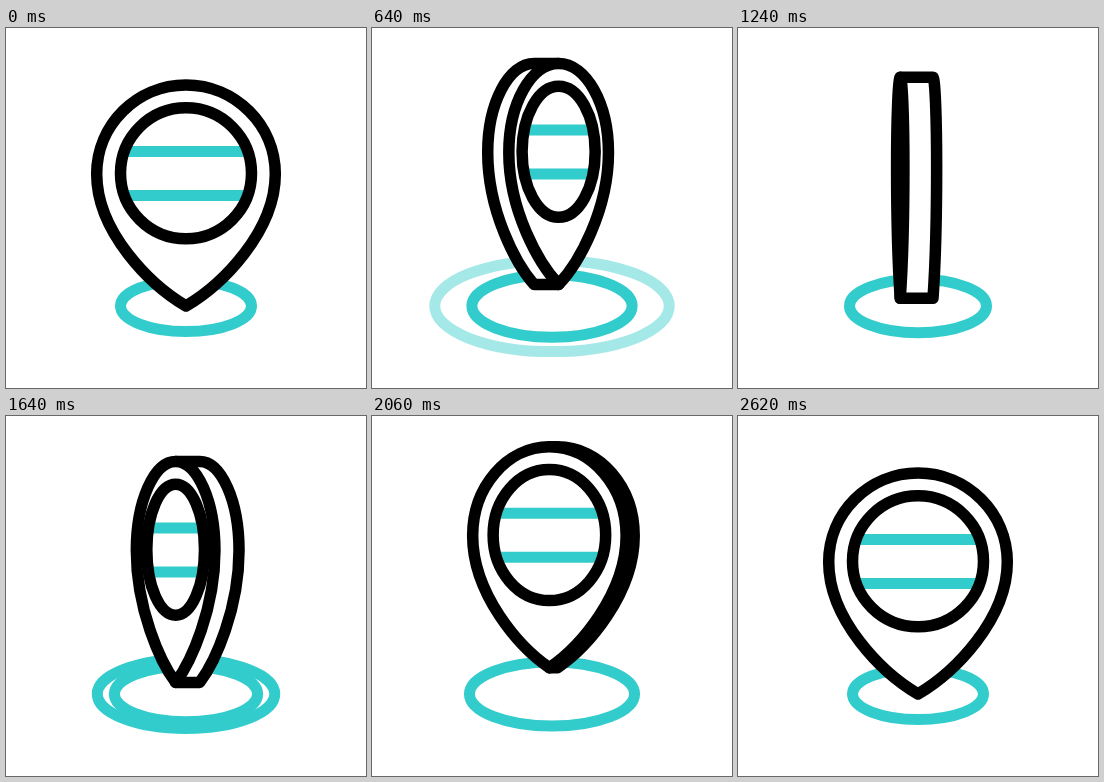
An HTML page with a canvas that plays this animation: 360 px wide and 360 px high, repeating every 3 s.

```html
<!DOCTYPE html>
<html lang="en">
<head>
<meta charset="utf-8">
<title>Turning map pin</title>
<style>
  html, body { margin: 0; width: 100%; height: 100%; overflow: hidden; background: #fff; }
  canvas { display: block; width: 100vw; height: 100vh; }
</style>
</head>
<body>
<canvas id="stage"></canvas>
<script>
const SIZE = 360, LOOP = 3000, STEP = 20;
const TEAL = '#33cccc', BLACK = '#000', WHITE = '#fff';
const CX = 180, TOP = 57, MID = 146, TIP = 278, HALF = 89.3;
const BOUNCE = { start: 193, leg: 603, height: 29 };
const TURN = { start: 197, half: 1002 };
const RIPPLE = { life: 550, fadeFrom: 318 };

const canvas = document.getElementById('stage');
const ctx = canvas.getContext('2d');
const ratio = window.devicePixelRatio || 1;
canvas.width = canvas.height = SIZE * ratio;
ctx.scale(ratio, ratio);
ctx.lineJoin = 'round';

const clamp = v => Math.min(1, Math.max(0, v));
const smooth = v => v * v * (3 - 2 * v);

function stroke(color, width) {
  ctx.strokeStyle = color;
  ctx.lineWidth = width;
  ctx.stroke();
}

function ring(rx, alpha) {
  ctx.globalAlpha = alpha;
  ctx.beginPath();
  ctx.ellipse(CX, TIP, rx, rx * 0.389, 0, 0, Math.PI * 2);
  stroke(TEAL, 11);
  ctx.globalAlpha = 1;
}

// One half of the drop outline, from the tip up to the top; half is signed.
function dropSide(x, half) {
  const k = half * 0.5523;
  ctx.bezierCurveTo(x + half * 0.4, 257, x + half, 204, x + half, MID);
  ctx.bezierCurveTo(x + half, MID - 49, x + k, TOP, x, TOP);
}

function dropSideDown(x, half) {
  const k = half * 0.5523;
  ctx.bezierCurveTo(x + k, TOP, x + half, MID - 49, x + half, MID);
  ctx.bezierCurveTo(x + half, 204, x + half * 0.4, 257, x, TIP);
}

function paintBody() {
  ctx.closePath();
  ctx.fillStyle = WHITE;
  ctx.fill();
  stroke(BLACK, 11.5);
}

function face(x, scale) {
  ctx.beginPath();
  ctx.moveTo(x, TIP);
  dropSide(x, -HALF * scale);
  dropSideDown(x, HALF * scale);
  paintBody();

  const chord = 61 * scale;
  ctx.beginPath();
  for (const y of [123.5, 167.5]) {
    ctx.moveTo(x - chord, y);
    ctx.lineTo(x + chord, y);
  }
  stroke(TEAL, 11);

  ctx.beginPath();
  ctx.ellipse(x, 145.3, 65.5 * scale, 65.5, 0, 0, Math.PI * 2);
  stroke(BLACK, 11.5);
}

function rim(frontX, backX, half) {
  ctx.beginPath();
  ctx.moveTo(frontX, TIP);
  ctx.lineTo(backX, TIP);
  dropSide(backX, half);
  ctx.lineTo(frontX, TOP);
  paintBody();
}

function pin(time, lift) {
  const turn = Math.min(2, Math.max(0, (time - TURN.start) / TURN.half));
  const firstHalf = turn < 1;
  const edge = firstHalf ? turn : 2 - turn;
  const side = firstHalf ? 1 : -1;
  const [near, far, pinch] = firstHalf ? [15, 17.5, 14] : [18.5, 15, 0];
  const scale = 1 - edge;
  const narrow = pinch * edge * scale;
  const frontX = CX + side * near * edge;
  const backX = CX - side * (far * (1 - scale ** 3) + narrow);

  ctx.save();
  ctx.translate(0, -lift);
  if (edge > 0) rim(frontX, backX, -side * Math.max(0, HALF * scale - narrow));
  face(frontX, scale);
  ctx.restore();
}

function draw(time) {
  ctx.fillStyle = WHITE;
  ctx.fillRect(0, 0, SIZE, SIZE);

  const period = BOUNCE.leg * 2;
  const since = time - BOUNCE.start;
  const moving = since > 0 && since < period * 2;
  const local = moving ? since % period : 0;
  const rise = 1 - Math.abs(local / BOUNCE.leg - 1);

  if (moving && local < RIPPLE.life) {
    const fade = clamp((RIPPLE.life - local) / (RIPPLE.life - RIPPLE.fadeFrom));
    ring(65.5 + 57 * smooth(local / RIPPLE.life), fade);
  }
  ring(65.5 + 17.5 * smooth(rise), 1);
  pin(time, BOUNCE.height * rise);
}

let began;
function tick(now) {
  began ??= now;
  const time = (now - began) % LOOP;
  draw(Math.floor(time / STEP) * STEP);
  requestAnimationFrame(tick);
}
draw(0);
requestAnimationFrame(tick);
</script>
</body>
</html>
```
